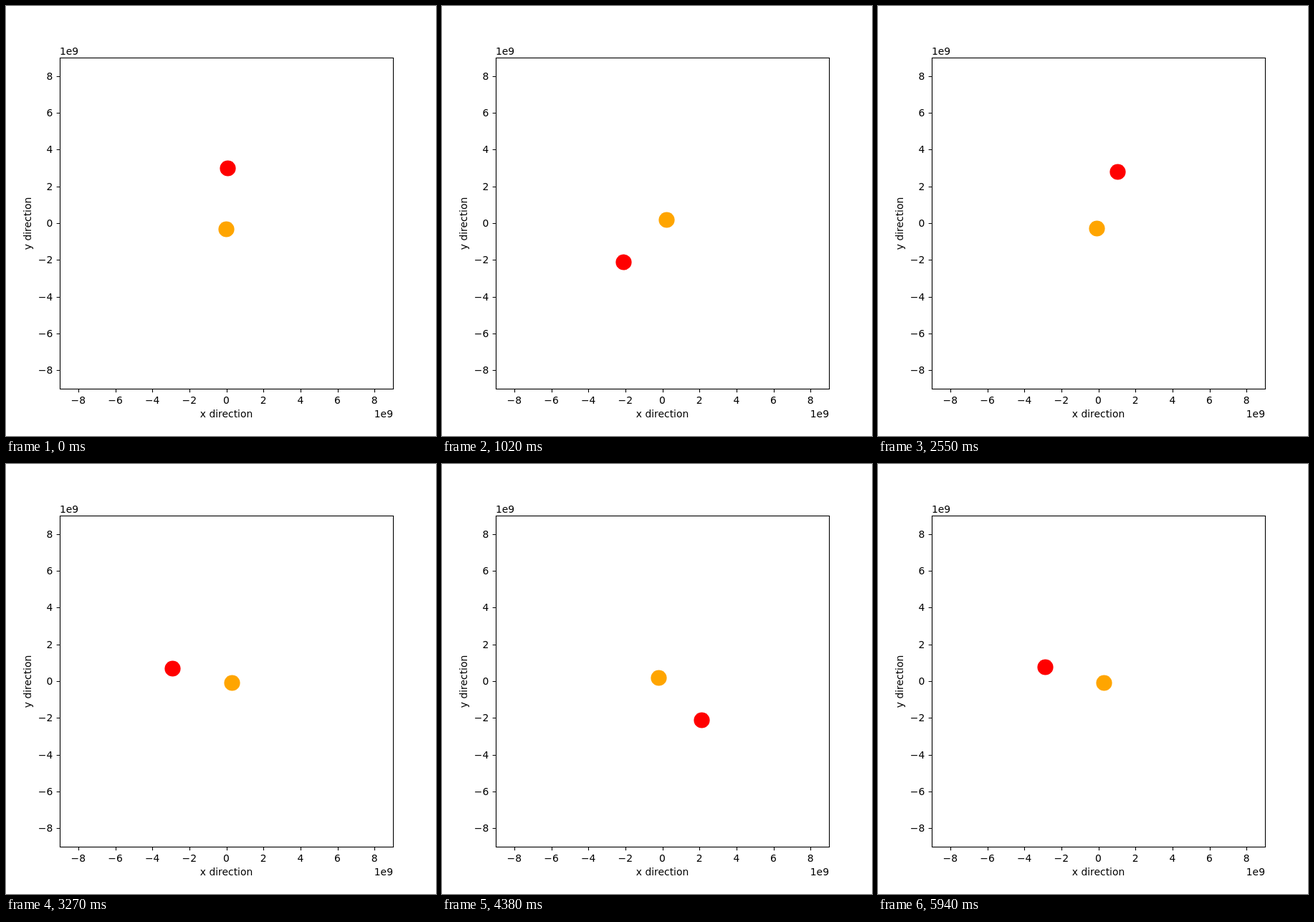
Animation of 600x600 px, one loop 5.97 s. Source, as an HTML page:

```html
<!DOCTYPE html>
<html lang="en">
<head>
<meta charset="utf-8">
<title>Two-body orbit</title>
<style>
  html, body { margin: 0; width: 100%; height: 100%; overflow: hidden; background: #fff; }
  svg { display: block; width: 600px; height: 600px; }
  text { font: 13.89px "DejaVu Sans", sans-serif; fill: #000; }
  .lines { fill: none; stroke: #000; stroke-width: 1.11; }
</style>
</head>
<body>
<svg viewBox="0 0 600 600">
  <circle id="small" r="11.1" fill="#f00"/>
  <circle id="big" r="11.1" fill="#ffa500"/>
  <g id="axes">
    <rect class="lines" x="75.5" y="72.5" width="465" height="462"/>
    <text x="75" y="68">1e9</text>
    <text x="540" y="574" text-anchor="end">1e9</text>
    <text x="307.5" y="574" text-anchor="middle">x direction</text>
    <text transform="translate(35 303.5) rotate(-90)" text-anchor="middle">y direction</text>
  </g>
</svg>
<script>
const CENTER = { x: 307.5, y: 303 };
const UNIT = { x: 465 / 18, y: 462 / 18 };
const STEP = 30, STEPS = 199;
const RADIUS = 2.997, RATIO = 0.0997;

const axes = document.getElementById('axes');
const small = document.getElementById('small');
const big = document.getElementById('big');
const snap = v => Math.round(v) + 0.5;

function add(tag, attrs, text = '') {
  const el = document.createElementNS('http://www.w3.org/2000/svg', tag);
  for (const key in attrs) el.setAttribute(key, attrs[key]);
  el.textContent = text;
  axes.append(el);
}

for (let v = -8; v <= 8; v += 2) {
  const x = CENTER.x + v * UNIT.x;
  const y = CENTER.y - v * UNIT.y;
  const label = String(v).replace('-', '\u2212');
  add('path', { class: 'lines', d: `M${snap(x)} 534.5v4.86M75.5 ${snap(y)}h-4.86` });
  add('text', { x, y: 555, 'text-anchor': 'middle' }, label);
  add('text', { x: 65.3, y: Math.round(y + 5), 'text-anchor': 'end' }, label);
}

// Markers sit on whole pixels, as in the plot's renderer.
function place(body, radius, angle) {
  body.setAttribute('cx', snap(CENTER.x + radius * UNIT.x * Math.cos(angle)));
  body.setAttribute('cy', snap(CENTER.y - radius * UNIT.y * Math.sin(angle)));
}

function draw(time) {
  const n = Math.floor(time / STEP) % STEPS;
  const angle = (88.53 + 4.01 * n + 5.9e-5 * n * n) * Math.PI / 180;
  place(small, RADIUS, angle);
  place(big, -RADIUS * RATIO, angle);
}

const start = performance.now();
function tick() {
  draw(performance.now() - start);
  requestAnimationFrame(tick);
}
tick();
</script>
</body>
</html>
```
